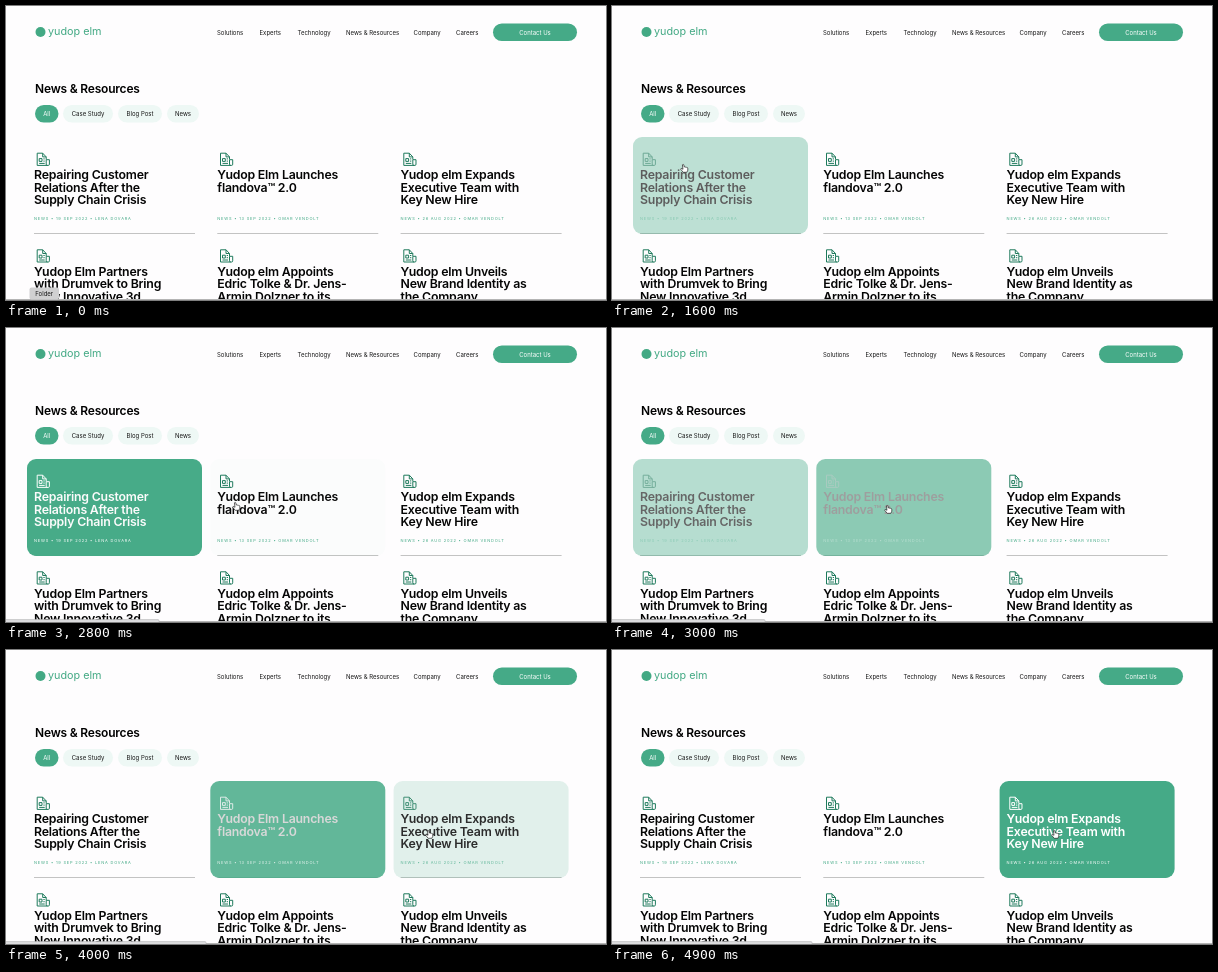
Recreate the animation shown at these times as an HTML page. Size 600 px wide and 294 px high, loop 5000 ms.

```html
<!DOCTYPE html>
<html lang="en">
<head>
<meta charset="utf-8">
<title>News &amp; Resources</title>
<style>
  html, body { margin: 0; width: 100%; height: 100%; overflow: hidden; background: #fefdfe; }
  svg { display: block; width: 100vw; height: 100vh; font-family: Inter, "Open Sans", sans-serif; }
  .nav { font-size: 6px; fill: #161616; }
  .mid { text-anchor: middle; }
  .head { font-size: 12px; font-weight: 600; letter-spacing: -.2px; }
  .title { font-size: 12.3px; font-weight: 600; letter-spacing: -.2px; }
  .meta { font-size: 4px; letter-spacing: .78px; }
  .logo { font-size: 10.8px; fill: #43a984; }
</style>
</head>
<body>
<svg id="stage" viewBox="0 0 600 294" preserveAspectRatio="none"></svg>
<script>
const LOOP = 5000, STEP = 100, FADE = 400;
const GREEN = [69, 170, 135], DARK = [30, 122, 92], BLACK = [5, 5, 5], WHITE = [255, 255, 255];
const stage = document.getElementById('stage');

function add(name, attrs, parent = stage) {
  const el = document.createElementNS('http://www.w3.org/2000/svg', name);
  for (const key in attrs) el.setAttribute(key, attrs[key]);
  parent.appendChild(el);
  return el;
}
function text(x, y, content, cls, attrs = {}, parent = stage) {
  const el = add('text', { x, y, class: cls, ...attrs }, parent);
  el.textContent = content;
  return el;
}
function box(x, y, width, height, rx, fill, parent = stage) {
  return add('rect', { x, y, width, height, rx, fill }, parent);
}
const mix = (a, b, k) => `rgb(${a.map((v, i) => Math.round(v + (b[i] - v) * k))})`;
const clamp = v => Math.max(0, Math.min(1, v));
const ease = v => v * v * (3 - 2 * v);

// Header
add('circle', { cx: 34.5, cy: 26, r: 5, fill: '#43a984' });
text(42, 29, 'yudop elm', 'logo');
[[211, 'Solutions'], [253.5, 'Experts'], [291.5, 'Technology'],
 [340, 'News & Resources'], [407.5, 'Company'], [450, 'Careers']]
  .forEach(([x, label]) => text(x, 28.6, label, 'nav'));
box(487, 17.5, 84, 17.5, 8.75, '#45aa87');
text(529, 28.6, 'Contact Us', 'nav mid', { style: 'fill:#fff' });

// Filters
text(29, 87, 'News & Resources', 'head');
[[29, 23.5, 'All'], [57, 50, 'Case Study'], [112, 44, 'Blog Post'], [161, 32, 'News']]
  .forEach(([x, w, label], i) => {
    box(x, 99, w, 17.5, 8.75, i ? '#eef8f5' : '#45aa87');
    text(x + w / 2, 110, label, 'nav mid', i ? {} : { style: 'fill:#fff' });
  });

// Articles
const articles = [
  { lines: ['Repairing Customer', 'Relations After the', 'Supply Chain Crisis'],
    meta: 'NEWS • 19 SEP 2022 • LENA DOVARA', on: 1440, off: 2770 },
  { lines: ['Yudop Elm Launches', 'flandova™ 2.0'],
    meta: 'NEWS • 13 SEP 2022 • OMAR VENDOLT', on: 2770, off: 3900 },
  { lines: ['Yudop elm Expands', 'Executive Team with', 'Key New Hire'],
    meta: 'NEWS • 26 AUG 2022 • OMAR VENDOLT', on: 3900, off: Infinity },
  { lines: ['Yudop Elm Partners', 'with Drumvek to Bring', 'New Innovative 3d'] },
  { lines: ['Yudop elm Appoints', 'Edric Tolke & Dr. Jens-', 'Armin Dolzner to its'] },
  { lines: ['Yudop elm Unveils', 'New Brand Identity as', 'the Company'] }
];
const ICON = 'M10 7V4.5L6.5 .8H1V13H12.2Q13.2 13 13.2 11.8V7.3H10V11.8Q10 13 11.2 13' +
  'M6.5 .8V4.5H10M3 6.2H5.8V9H3ZM7.2 6.5H8.5M7.2 8.7H8.5M3 11H8.5';

function buildArticle(a, i) {
  const x = 28 + (i % 3) * 183.3, y = i < 3 ? 131 : 227.6;
  if (a.meta) {
    add('path', { d: `M${x} ${y + 96.5}h161`, stroke: '#bdbdbd', 'stroke-width': .9 });
    a.fill = box(x - 7, y, 175, 97, 9, mix(GREEN, GREEN, 0));
  }
  a.icon = add('path', { d: ICON, transform: `translate(${x + 2.2} ${y + 15.4})`,
    fill: 'none', stroke: mix(DARK, DARK, 0), 'stroke-width': 1 });
  a.copy = add('g', { fill: mix(BLACK, BLACK, 0) });
  a.lines.forEach((line, n) => text(x, y + 42 + n * 12.5, line, 'title', {}, a.copy));
  if (a.meta) a.info = text(x, y + 82.8, a.meta, 'meta');
}
articles.forEach(buildArticle);
const cards = articles.slice(0, 3);

// Screen edge, link status bar, dock label
box(0, 293, 600, 1, 0, '#b4b4b4');
const status = add('g', {});
const statusBar = box(-2, 291.6, 202, 5, 1, '#dcdcde', status);
statusBar.setAttribute('stroke', '#b5b5b7');
statusBar.setAttribute('stroke-width', .6);
const label = add('g', {});
box(23.5, 281.5, 29.5, 12, 2, '#d0d0d1', label);
text(38.2, 289.6, 'Folder', 'nav mid', {}, label);

// Pointer
const pointer = add('g', { fill: '#fff', stroke: '#222', 'stroke-width': .7, 'stroke-linejoin': 'round' });
const arrow = add('path', { d: 'M0 0V7.6L1.8 6L3 8.8L4.3 8.2L3.1 5.5H5.5Z' }, pointer);
const hand = add('path', { d: 'M-1.6 -3.2Q-.9 -4.2 -.2 -3.2L.3 -1Q1.1 -1.6 1.6 -.8Q2.4 -1.2 2.8 -.4' +
  'Q3.8 -.6 3.8 .6V2.2L2.9 4.3H-.8L-3.2 1.4Q-3.4 .3 -2.2 .5L-1 1.3Z' }, pointer);
const route = [
  [600, 4, 266], [700, 2, 244], [800, 1, 215], [1000, 1, 215], [1400, 39.5, 148],
  [1600, 72, 162], [1900, 87, 168], [2200, 89, 169], [2400, 110, 170], [2800, 230, 178],
  [3000, 276, 181], [3200, 282, 181], [3500, 284, 181], [3800, 375, 184],
  [4000, 423, 184], [4200, 443, 184], [5000, 443, 184]
];
function pointerAt(t) {
  const i = Math.max(1, route.findIndex(p => p[0] >= t));
  const [t0, x0, y0] = route[i - 1], [t1, x1, y1] = route[i];
  const k = clamp((t - t0) / (t1 - t0));
  return [x0 + (x1 - x0) * k, y0 + (y1 - y0) * k];
}
const show = (el, on) => el.setAttribute('visibility', on ? 'visible' : 'hidden');

function render(t) {
  for (const c of cards) {
    const k = ease(clamp((t - c.on) / FADE)) - ease(clamp((t - c.off) / FADE));
    c.fill.setAttribute('opacity', k);
    c.icon.setAttribute('stroke', mix(DARK, WHITE, k));
    c.copy.setAttribute('fill', mix(BLACK, WHITE, k));
    c.info.setAttribute('fill', mix(GREEN, WHITE, k));
  }
  label.setAttribute('opacity', clamp((400 - t) / 300));
  show(status, t >= 1700);
  statusBar.setAttribute('width', t >= 2800 && t < 4000 ? 155 : 202);
  show(pointer, t >= 600);
  arrow.style.display = t < 1300 ? '' : 'none';
  hand.style.display = t < 1300 ? 'none' : '';
  pointer.setAttribute('transform', `translate(${pointerAt(t)})`);
}

const start = performance.now();
function tick(now) {
  const t = Math.max(0, now - start) % LOOP;
  render(Math.floor(t / STEP) * STEP);
  requestAnimationFrame(tick);
}
render(0);
requestAnimationFrame(tick);
</script>
</body>
</html>
```
